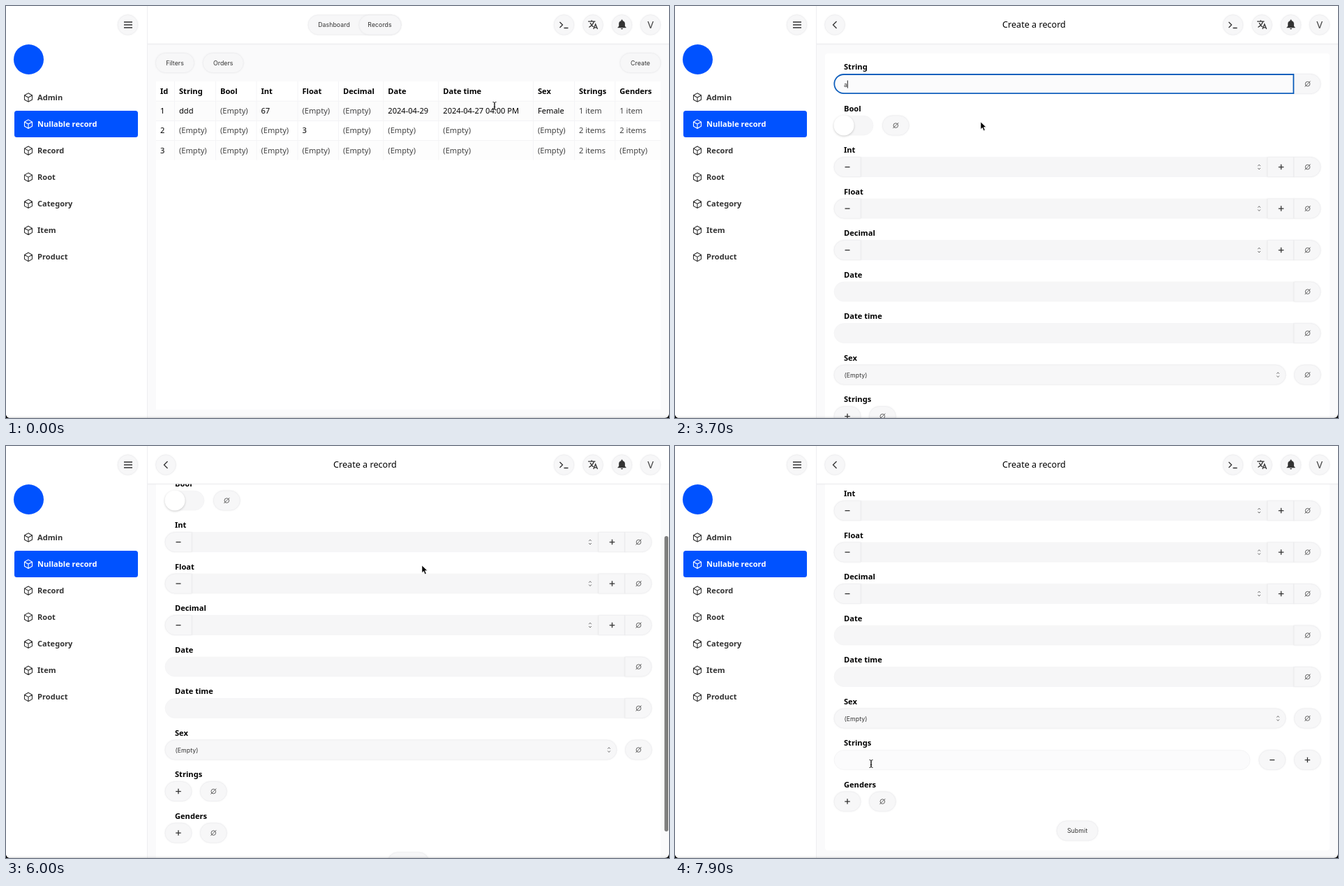
These frames come from a looping animation (950x590 px, 8 s). An HTML page:

```html
<!DOCTYPE html>
<html lang="en">
<head>
<meta charset="utf-8">
<title>Admin panel</title>
<style>
  html, body { margin: 0; width: 100%; height: 100%; overflow: hidden; background: #000; }
  svg { display: block; background: #fafafb; border-radius: 0 0 6px 6px; }
  text { font: 11.1px "Noto Sans", sans-serif; fill: #000; }
  .b { font-weight: 700; }
  .side { fill: #333; }
  .soft { fill: #444; }
  .title { font-size: 12.6px; }
  .small { font: 8.75px Inter, sans-serif; letter-spacing: .05px; fill: #333; }
  .user { font-size: 14.5px; font-weight: 500; fill: #444; }
  .mid { text-anchor: middle; }
  .field { fill: #f6f6f7; stroke: #f2f2f4; stroke-width: .6; }
  .btn { fill: #f7f7f8; stroke: #ebebee; stroke-width: .7; filter: drop-shadow(0 .7px .8px #00000010); }
  .open { fill: #fbfbfc; stroke: #f1f1f3; stroke-width: .7; }
  .icon { fill: none; stroke: #333; stroke-width: 1.3; }
  .thin { fill: none; stroke: #555; stroke-width: .9; }
  .grid { fill: none; stroke: #f4f4f6; }
</style>
</head>
<body>
<svg id="stage" width="950" height="590" viewBox="0 0 950 590"></svg>
<script>
const text = (x, y, s, cls = '') => `<text x="${x}" y="${y + (cls.includes('small') ? 3.2 : 4)}" class="${cls}">${s}</text>`;
const rect = (x, y, w, h, attrs) => `<rect x="${x}" y="${y}" width="${w}" height="${h}" ${attrs}/>`;
const icon = (x, y, d, cls = 'icon', extra = '') => `<path transform="translate(${x} ${y}) ${extra}" d="${d}" class="${cls}"/>`;
const circle = (x, y) => `<circle cx="${x}" cy="${y}" r="14.3" class="btn"/>`;

// Bar centred on y, with separate corner radii for its left and right end
function bar(x, y, w, cls, left = 14, right = 14, h = 28, id = '') {
  const arc = (r, dx, dy) => `a${r} ${r} 0 0 1 ${dx * r} ${dy * r}`;
  return `<path id="${id}" class="${cls}" d="M${x + left} ${y - h / 2}H${x + w - right}${arc(right, 1, 1)}v${h - 2 * right}` +
    `${arc(right, -1, 1)}H${x + left}${arc(left, -1, -1)}v${2 * left - h}${arc(left, 1, -1)}z"/>`;
}

const minus = (x, y) => icon(x, y, 'M-3.5 0H3.5');
const plus = (x, y) => icon(x, y, 'M-3.7 0H3.7M0-3.7V3.7', 'icon', 'scale(1.02)');
const empty = (x, y) => icon(x, y, 'M-3.3 0a3.3 3.3 0 1 0 6.600 0a3.3 3.3 0 1 0-6.600 0M-4 4L4-4', 'thin');
const arrows = (x, y) => icon(x, y, 'M-1.900-1.500L0-3.600L1.900-1.500M-1.900 1.500L0 3.600L1.900 1.500', 'thin', 'scale(.95)');
const pillButton = (cx, y, sign) => bar(cx - 19, y, 38, 'btn') + sign(cx, y);
const endNull = y => bar(887, y, 38, 'btn', 0, 14) + empty(906.5, y);

function sidebar() {
  const cube = 'M0-6.2L5.500-3.100V3.100L0 6.200L-5.500 3.100V-3.100ZM-5.500-3.100L0 0L5.500-3.100M0 0V6.200';
  const names = ['Admin', 'Nullable record', 'Record', 'Root', 'Category', 'Item', 'Product'];
  return rect(0, 0, 202.5, 590, 'fill="#fff"') + rect(202, 0, 1, 590, 'fill="#eeeef1"') +
    circle(174.5, 27) + icon(175, 27, 'M-6-4H6M-6 0H6M-6 4H6') +
    '<circle cx="32.5" cy="76.5" r="21.5" fill="#0052ff"/>' +
    rect(12, 150, 177, 38, 'rx="3.5" fill="#0052ff"') +
    names.map((name, i) => {
      const y = 131 + i * 38.07, on = i == 1;
      return icon(32, y, cube, 'icon', `" style="stroke-width:1.1;stroke:${on ? '#fff' : '#333'}`) +
        `<g ${on ? 'style="--c:#fff"' : ''}>` + text(45, y, name, 'b side').replace('<text', on ? '<text style="fill:#fff"' : '<text') + '</g>';
    }).join('');
}

function header() {
  const bell = 'M12 22.500c1.200 0 2.200-.9 2.200-2h-4.400c0 1.100 1 2 2.200 2zM18.500 16v-5.500c0-3-1.800-5.300-4.800-6v-1a1.700 1.700 0 0 0-3.400 0v1c-3 .7-4.800 3-4.800 6V16l-2.500 2.200v1.300h18v-1.300z';
  const translate = 'M1 5h16M9 2v3M14 5Q12 12 3 18M5.500 8Q8 13 13 17M13 22L17.500 11L22 22M14.500 18.500h6';
  return rect(203, 0, 747, 54, 'fill="#fff"') + rect(203, 53.6, 747, 1, 'fill="#ededf0"') +
    rect(203, 54.6, 747, 1.5, 'fill="#00000005"') +
    [799.5, 841, 882.5, 923.5].map(x => circle(x, 27)).join('') +
    icon(799.5, 27, 'M-6-4L-2 0L-6 4M0 4.500H6') +
    icon(833.5, 19, translate, 'icon', 'scale(.64)" style="stroke-width:2') +
    icon(874.5, 18.3, bell, '', 'scale(.67)" fill="#333') +
    `<text x="923.7" y="32.200" class="user mid">V</text>`;
}

function table() {
  const heads = ['Id', 'String', 'Bool', 'Int', 'Float', 'Decimal', 'Date', 'Date time', 'Sex', 'Strings', 'Genders'];
  const xs = [221, 248, 307, 365.5, 424.5, 483, 547.3, 626.3, 762, 821, 879.3];
  const rows = [
    ['1', 'ddd', , '67', , , '2024-04-29', '2024-04-27 04:00 PM', 'Female', '1 item', '1 item'],
    ['2', , , , '3', , , , , '2 items', '2 items'],
    ['3', , , , , , , , , '2 items', ,]
  ];
  let out = rect(215, 108, 723, 470, 'fill="#fff"') + rect(215, 136, 723, 28.2, 'fill="#fcfcfc"') +
    rect(215, 192.4, 723, 28.2, 'fill="#fdfdfd"');
  xs.forEach((x, c) => {
    if (c) out += `<path class="grid" d="M${x - 6.5} 108V220.500"/>`;
    out += text(x, 122, heads[c], 'b');
    rows.forEach((row, r) => out += text(x, 150.2 + r * 28.2, row[c] || '(Empty)', row[c] && c < 9 ? '' : 'soft'));
  });
  for (let r = 1; r < 4; r++) out += `<path class="grid" d="M215 ${108 + r * 28.2}H938"/>`;
  return out;
}

function tableBar() {
  return bar(433, 27, 133, 'btn') + bar(506, 27, 60, 'btn') +
    text(470, 27, 'Dashboard', 'small mid') + text(535.5, 27, 'Records', 'small mid') +
    [[242, 55, 'Filters'], [311.2, 58, 'Orders'], [909, 58, 'Create']]
      .map(([x, w, s]) => bar(x - w / 2, 81.5, w, 'btn') + text(x, 81.5, s, 'small mid')).join('');
}

function form() {
  const labels = ['String', 'Bool', 'Int', 'Float', 'Decimal', 'Date', 'Date time', 'Sex', 'Strings', 'Genders'];
  const wide = y => bar(228, y, 659, 'field', 14, 0) + endNull(y);
  const number = y => bar(266, y, 583, 'field', 0, 0) + bar(228, y, 38, 'btn', 14, 0) + minus(247, y) +
    arrows(837, y) + bar(849, y, 38, 'btn', 0, 0) + plus(868.5, y) + endNull(y);
  const list = y => pillButton(247, y, plus) + pillButton(297.3, y, empty);
  const controls = [
    y => wide(y) + bar(228.3, y, 658, 'open', 13.6, 0, 27.2, 'focus') + text(242, y + 1, 'a', 'small').replace('<text', '<text id="typed"') +
      `<path id="caret" d="M0 ${y - 5}v11" stroke="#222"/>`,
    y => bar(228, y, 56, 'field') + `<circle cx="242" cy="${y}" r="14.500" fill="#fff" style="filter:drop-shadow(0 1px 1.500px #0003)"/>` +
      pillButton(316.3, y, empty),
    number, number, number, wide, wide,
    y => bar(228, y, 647, 'btn') + text(242.5, y + .5, '(Empty)', 'small') + arrows(864, y) + pillButton(906.3, y, empty),
    y => `<g id="noItems">${list(y)}</g><g id="oneItem">${bar(228, y, 596, 'open')}${pillButton(855.7, y, minus)}${pillButton(906.3, y, plus)}</g>`,
    list
  ];
  return rect(215, 68, 723, 649, 'rx="4" fill="#fff"') +
    labels.map((s, i) => text(242, 87 + i * 59.5, s, 'b') + controls[i](111.6 + i * 59.5)).join('') +
    bar(547, 689, 59, 'btn') + text(576.5, 689, 'Submit', 'small mid');
}

const $ = id => document.getElementById(id);
$('stage').innerHTML =
  `<g id="table">${table()}</g><g id="form">${form()}</g>` + header() +
  `<g id="tableBar">${tableBar()}</g>` +
  `<g id="formBar">${circle(229, 27)}${icon(229, 27, 'M2-5L-3 0L2 5', 'icon', 'translate(.5 0)')}${text(514.5, 27.4, 'Create a record', 'title mid')}</g>` +
  sidebar() + rect(943.5, 54, 5.5, 423, 'id="thumb" rx="2.75" fill="#7d7d7d"') +
  rect(0, 587, 950, 3, 'fill="#00000008"') + rect(0, 589, 950, 1, 'fill="#00000022"') +
  '<path id="arrow" d="M0 0V10.500L2.500 8.300L4.300 12.600L6.200 11.800L4.400 7.600H7.800Z" stroke="#fff" stroke-width=".6"/>' +
  '<path id="beam" d="M-2.500-5.500Q0-5.500 0-4V4Q0 5.500-2.500 5.500M2.500-5.500Q0-5.500 0-4V4Q0 5.500 2.500 5.500M-1.200 1.500H1.200" fill="none" stroke="#222"/>';

// Keys are [time, value, ...]
const mouse = [
  [0, 700, 143], [200, 712, 156], [300, 760, 150], [400, 840, 115], [500, 895, 86], [600, 909, 82],
  [900, 909, 82], [1000, 850, 104], [1200, 610, 173], [1300, 500, 195], [1400, 425, 210], [1500, 402, 214],
  [1600, 402, 214], [1900, 345, 140], [2100, 308, 111], [2200, 306, 110],
  [3200, 306, 110], [3500, 390, 152], [3700, 438, 166], [3900, 820, 120], [4000, 911, 112],
  [4200, 911, 112], [4600, 560, 114], [4900, 306, 111], [5200, 306, 111], [5600, 596, 171],
  [6000, 596, 171], [6200, 510, 262], [6400, 417, 364], [6600, 417, 364], [6900, 300, 430], [7100, 250, 453],
  [7700, 250, 453], [7900, 281, 455]
];
const scrolling = [[5700, 0], [5800, 22], [6000, 93], [6100, 116], [6200, 129], [6400, 139], [7600, 139], [7700, 138]];

function at(keys, t) {
  const next = keys.findIndex(k => k[0] > t);
  if (next < 0) return keys.at(-1).slice(1);
  if (!next) return keys[0].slice(1);
  const a = keys[next - 1], b = keys[next], p = (t - a[0]) / (b[0] - a[0]);
  return a.slice(1).map((v, i) => v + (b[i + 1] - v) * p);
}
const show = (id, on) => $(id).style.display = on ? '' : 'none';
const within = (t, from, to) => t >= from && t < to;

function draw(now) {
  const t = Math.floor(now % 8000 / 100) * 100;
  const created = t >= 900, added = t >= 7700;
  for (const id of ['table', 'tableBar']) show(id, !created);
  for (const id of ['form', 'formBar']) show(id, created);

  const focus = within(t, 2400, 4000) || t >= 5000;
  const typed = within(t, 3200, 4100) || t >= 5200;
  show('focus', focus || typed);
  $('focus').style.cssText += focus ? ';stroke:#1160bd;stroke-width:1.8' : ';stroke:#f1f1f3;stroke-width:.7';
  show('typed', typed);
  show('caret', focus);
  $('caret').setAttribute('transform', `translate(${typed ? 247.3 : 242.5} 0)`);
  show('noItems', !added);
  show('oneItem', added);

  const [scroll] = at(scrolling, t);
  $('form').setAttribute('transform', `translate(0 ${-scroll})`);
  $('thumb').setAttribute('y', 54 + scroll * .806);
  $('thumb').style.opacity = t < 5800 ? 0 : Math.min(1, Math.max(0, (7900 - t) / 300));

  const [x, y] = at(mouse, t);
  const overField = within(t, 900, 5800) && x < 887 && y > 97 && y < 126;
  const beam = t < 200 || overField || t >= 7800;
  show('beam', beam);
  show('arrow', !beam);
  $(beam ? 'beam' : 'arrow').setAttribute('transform', `translate(${x} ${y})`);
}

const start = performance.now();
function tick() {
  draw(performance.now() - start);
  requestAnimationFrame(tick);
}
tick();
</script>
</body>
</html>
```
